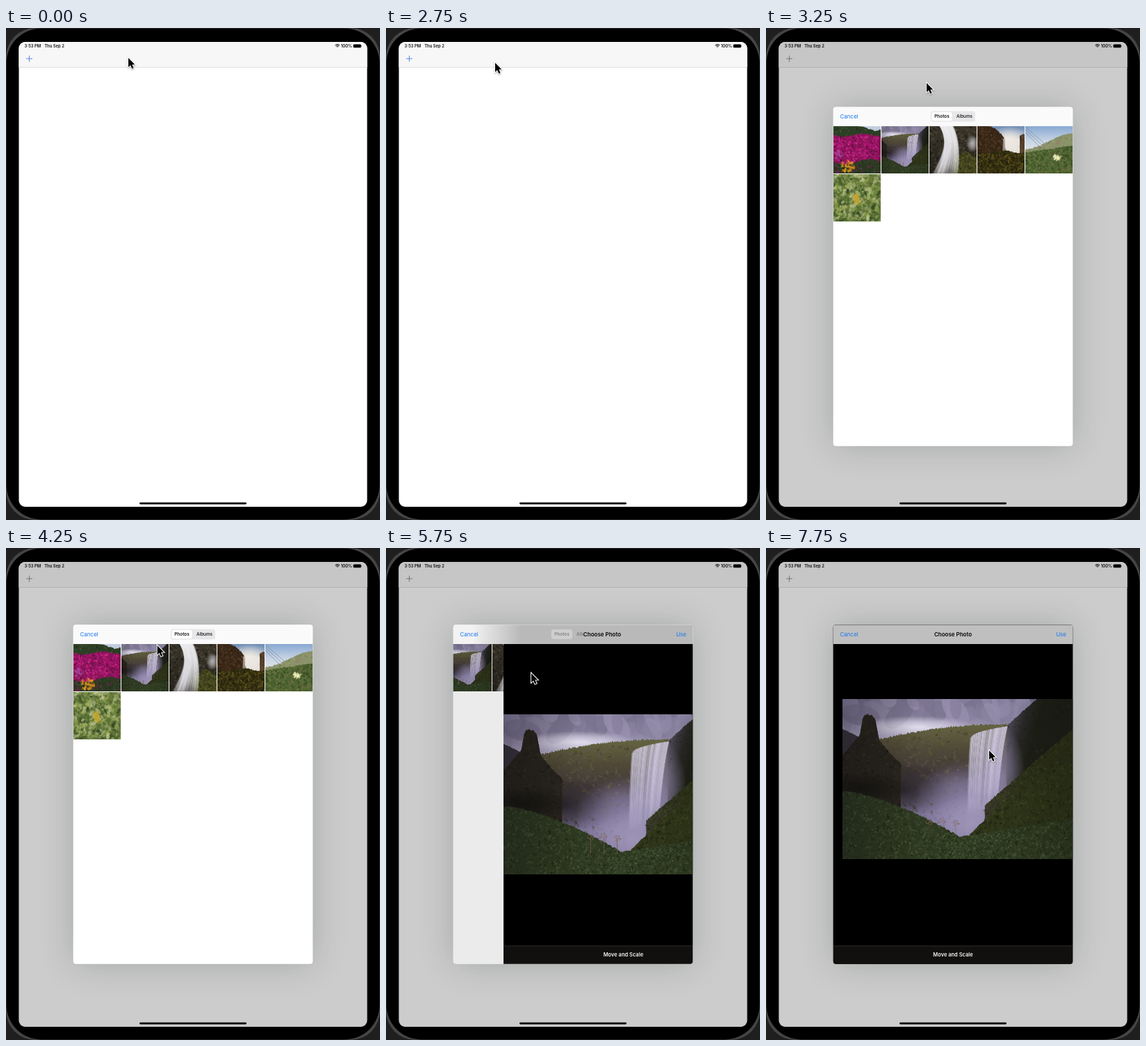
Write an HTML page with a canvas that moves like this. It is 538 px wide and 707 px high and loops after 8 s.

```html
<!DOCTYPE html>
<html lang="en">
<head>
<meta charset="utf-8">
<title>Photo picker</title>
<style>
html, body { margin: 0; width: 100%; height: 100%; overflow: hidden; background: #000; }
canvas { display: block; width: 538px; height: 707px; }
</style>
</head>
<body>
<canvas id="stage"></canvas>
<script>
const W = 538, H = 707, LOOP = 8000, STEP = 250;
const SHEET = { x: 96.7, y: 110.3, w: 344.6, h: 487.4 };
const EDGE = 97, BAR_END = 138, CELL = 68, PITCH = 69;
const PHOTO = { w: 344, h: 230, y: 239 };
const BLUE = '#1a78f0', INK = '#111';
const canvas = document.getElementById('stage');
const ratio = window.devicePixelRatio || 1;
canvas.width = W * ratio;
canvas.height = H * ratio;
const ctx = canvas.getContext('2d');

const clamp = v => Math.max(0, Math.min(1, v));
const mix = (a, b, u) => a + (b - a) * u;
const smooth = u => u * u * (3 - 2 * u);
const bell = (x, mid, width, power = 2) => Math.exp(-(Math.abs((x - mid) / width) ** power));

let seed = 11;
function rnd() {
  seed = (seed * 1664525 + 1013904223) >>> 0;
  return seed / 4294967296;
}

function box(g, x, y, w, h, r, fill) {
  g.beginPath();
  g.roundRect(x, y, w, h, r);
  g.fillStyle = fill;
  g.fill();
}

function text(str, x, y, size, weight, color, align = 'left') {
  ctx.font = `${weight} ${size}px Inter, "Liberation Sans", sans-serif`;
  ctx.textAlign = align;
  ctx.fillStyle = color;
  ctx.fillText(str, x, y);
}

// ---- pictures ----

function picture(w, h, paint) {
  const c = document.createElement('canvas');
  c.width = w * 2;
  c.height = h * 2;
  const g = c.getContext('2d');
  g.scale(2, 2);
  paint(g, w, h);
  return c;
}

function shade(g, x0, y0, x1, y1, colors) {
  const s = g.createLinearGradient(x0, y0, x1, y1);
  colors.forEach((c, i) => s.addColorStop(i / (colors.length - 1), c));
  return s;
}

function sky(g, w, h, ...colors) {
  g.fillStyle = shade(g, 0, 0, 0, h, colors);
  g.fillRect(0, 0, w, h);
}

function glow(g, x, y, rx, ry, rgb, alpha) {
  g.save();
  g.translate(x, y);
  g.scale(rx, ry);
  const s = g.createRadialGradient(0, 0, 0, 0, 0, 1);
  s.addColorStop(0, `rgba(${rgb},${alpha})`);
  s.addColorStop(0.5, `rgba(${rgb},${alpha * 0.6})`);
  s.addColorStop(1, `rgba(${rgb},0)`);
  g.fillStyle = s;
  g.fillRect(-1, -1, 2, 2);
  g.restore();
}

function flecks(g, count, size, tints, place) {
  for (let i = 0; i < count; i++) {
    g.fillStyle = tints[i % tints.length];
    g.globalAlpha = 0.2 + rnd() * 0.5;
    g.beginPath();
    g.ellipse(...place(), size * (0.4 + rnd()), size * (0.2 + rnd() * 0.4), rnd() * 3, 0, 7);
    g.fill();
  }
  g.globalAlpha = 1;
}

const cluster = (x, y, rx, ry) => () => {
  const a = rnd() * 7, r = Math.sqrt(rnd());
  return [x + Math.cos(a) * r * rx, y + Math.sin(a) * r * ry];
};

// Everything under the skyline top(x), with a ragged edge and flecks.
function land(g, x0, x1, top, fill, tints, count, size = 2) {
  const floor = g.canvas.height / 2;
  g.beginPath();
  g.moveTo(x0, floor);
  for (let x = x0; x <= x1; x++) g.lineTo(x, top(x) + (rnd() - 0.5) * size);
  g.lineTo(x1, floor);
  g.fillStyle = fill;
  g.fill();
  flecks(g, count, size, tints, () => {
    const x = mix(x0, x1, rnd());
    return [x, mix(top(x) + size / 2, floor, rnd())];
  });
}

// Soft strands of water; at(u) gives the start, bend and end of each.
function strands(g, count, width, rgb, at) {
  for (let i = 0; i < count; i++) {
    const [x0, y0, cx, cy, x1, y1] = at(i / (count - 1));
    const a = 0.35 + rnd() * 0.35;
    g.strokeStyle = shade(g, 0, y0, 0, y1, [a, a * 0.8, a * 0.5, 0].map(v => `rgba(${rgb},${v})`));
    g.lineWidth = width * (0.5 + rnd());
    g.beginPath();
    g.moveTo(x0, y0);
    g.quadraticCurveTo(cx, cy, x1, y1);
    g.stroke();
  }
}

const valley = picture(PHOTO.w, PHOTO.h, (g, w, h) => {
  sky(g, w, 60, '#6c6782', '#9088a6', '#b9b2cd');
  flecks(g, 60, 26, ['#7a738f', '#9b93b2', '#8a83a0'], () => [rnd() * w, rnd() * 24]);
  glow(g, 105, 40, 85, 16, '236,233,247', 0.9);
  land(g, 0, 40, x => 42 + x * 0.5, '#3b3740', ['#2e2b30'], 20);
  land(g, 54, 250, x => 36 + 20 * ((x - 230) / 170) ** 2,
    shade(g, 0, 40, 0, 165, ['#62623f', '#514a38', '#443c3b', '#57506a', '#7d749a']),
    ['#3d3b2a', '#5d6138', '#4f463e', '#665d55'], 900, 3);
  glow(g, 90, 130, 75, 40, '36,31,32', 0.75);
  glow(g, 185, 150, 85, 62, '146,136,174', 0.9);
  glow(g, 185, 178, 60, 40, '160,151,186', 0.9);
  land(g, 236, w, x => 38 - (x - 237) * 0.9,
    shade(g, 232, 0, 285, 15, ['#8d84a4', '#4c4654', '#2a2927', '#1e2017']), ['#1b1c17', '#2f3320'], 300);
  glow(g, 225, 105, 38, 70, '150,140,176', 0.8);
  strands(g, 44, 2.2, '214,208,234', u => [
    186 + 51 * u, 55 - 16 * Math.sqrt(u), 183 + 45 * u, 75, 181 + 40 * u, 168
  ]);
  land(g, 205, w, x => 150 - (x - 208) * 0.87,
    shade(g, 205, 0, 260, 0, ['#3e3b32', '#2d321a']), ['#1d220f', '#444c22', '#353d1a', '#262b14'], 1300, 2.4);
  land(g, 183, w, x => 195 - 103 * Math.sin((x - 183) / 161 * Math.PI / 2),
    '#2f3519', ['#1c210f', '#444c25', '#363e20', '#262c15'], 1300, 2.4);
  land(g, 0, 84, x => 100 - 52 * bell(x, 36, 36) - 26 * bell(x, 39, 12, 6),
    '#2a261f', ['#1c1a15', '#3c3726', '#35302a', '#27251c'], 900, 2.2);
  glow(g, 30, 128, 70, 24, '18,18,13', 0.7);
  land(g, 0, w, x => x < 170 ? 132 + 66 * (x / 170) ** 1.5 : 198 - (x - 170) * 0.17,
    '#2f3a22', ['#1d2714', '#435332', '#4f6040', '#273219', '#394a2b'], 2600, 2.3);
  for (let x = 125; x < 170; x += 19) {
    flecks(g, 22, 1.4, ['#8d735e', '#765f50'], cluster(x, 174 + rnd() * 8, 5, 5));
    g.fillStyle = '#6d5b4c';
    g.fillRect(x, 178, 0.6, 22);
  }
  g.fillStyle = shade(g, 0, 0, w, 0, ['rgba(8,6,14,.3)', 'rgba(0,0,0,0)', 'rgba(0,0,0,0)', 'rgba(8,8,6,.25)']);
  g.fillRect(0, 0, w, h);
});

const blossoms = picture(CELL, CELL, (g, w, h) => {
  sky(g, w, h, '#c3cfdf', '#a5b5c4');
  land(g, 0, w, x => 8 * bell(x, 60, 18) - 2, '#2c3f25', ['#16251a', '#48633a', '#5f7c4c'], 240);
  land(g, 0, w, x => 13 + 2 * Math.sin(x / 9), '#8a1459', ['#d81f91', '#c21880', '#4a1035', '#e63aa3', '#b0126e'], 700);
  land(g, 0, w, x => 51 + 4 * Math.sin(x / 11), '#2b3a22', ['#1a2818', '#8e1a5c', '#48603a'], 120);
  flecks(g, 30, 2, ['#8b5caa', '#a25aa0'], cluster(8, 42, 8, 8));
  flecks(g, 60, 2.6, ['#f5a21b', '#f7bd31', '#dd7d12'], cluster(20, 58, 10, 8));
});

const cascade = picture(CELL, CELL, (g, w, h) => {
  sky(g, w, h, '#3a352a', '#25221c');
  flecks(g, 340, 2.6, ['#181713', '#4a4333', '#5a523f'], () => [rnd() * w, rnd() * h]);
  land(g, 36, w, x => 44 - 8 * bell(x, 52, 8), '#42431f', ['#6d672b', '#25270f', '#545a2a'], 220);
  strands(g, 40, 2, '238,238,241', u => [14 + 18 * u, -2, 34 + 14 * u, 26, 4 + 34 * u, 84]);
  strands(g, 20, 2, '222,220,226', u => [22 + 10 * u, 24, 20 + 6 * u, 46, 22 * u - 4, 84]);
  glow(g, 62, 25, 9, 13, '196,194,196', 0.9);
});

const falls = picture(CELL, CELL, (g, w) => {
  sky(g, w, 40, '#6f8cb4', '#b9c4d2', '#e9e0d4');
  glow(g, 46, 20, 28, 20, '255,245,230', 0.9);
  land(g, 0, 40, x => 18 * (x / 38) ** 3 - 2, '#392717', ['#21170f', '#553b21', '#63472a'], 260);
  strands(g, 30, 1.8, '236,231,226', u => [38 + 24 * u, 18, 38 + 25 * u, 28, 36 + 28 * u, 48]);
  land(g, 61, w, x => 14 - (x - 61) * 0.5, '#5c4530', ['#3c2c1d'], 30);
  land(g, 0, w, x => 37 + 2 * Math.sin(x / 8), '#2f2b10', ['#5e521c', '#18180a', '#766321', '#3d3918'], 520);
});

const meadow = picture(CELL, CELL, (g, w) => {
  sky(g, w, 42, '#88a8d2', '#c8d5e4', '#e9ebe8');
  land(g, 0, w, x => 33 - 23 * smooth(x / w), '#8b936a', ['#657247', '#a3a179', '#997a68'], 200);
  land(g, 0, w, x => 38 - x * 0.15, '#4f6531', ['#2a3f1c', '#748647', '#84704f', '#38502a'], 500);
  g.strokeStyle = '#667488';
  g.lineWidth = 0.5;
  for (let i = 0; i < 3; i++) {
    g.beginPath();
    g.moveTo(0, 9 - i * 4);
    g.lineTo(20 + i * 4, 29 - i * 2);
    g.stroke();
  }
  flecks(g, 34, 2.6, ['#fbfae0', '#f3edaa'], cluster(45, 45, 5, 4));
});

const leaves = picture(CELL, CELL, (g, w, h) => {
  sky(g, w, h, '#6b7d3e', '#5d7135');
  flecks(g, 520, 4.5, ['#2e4420', '#8da052', '#c3ca9a', '#4c662d', '#a9b55e'], () => [rnd() * w, rnd() * h]);
  flecks(g, 40, 3, ['#d3ae31', '#c9a42c'], cluster(33, 36, 3.5, 8));
});

const thumbs = [blossoms, valley, cascade, falls, meadow, leaves];

// ---- motion ----

const START = [176, 43], GRAB = [275, 370], PULL = 0.275;
// begin, end, x, y
const moves = [
  [0, 1000, 33, 42], [1750, 2750, 157, 50], [2750, 3250, 231, 79],
  [3250, 5000, 209, 180], [6000, 6750, ...GRAB], [7000, 7750, 321, 291]
];

function pointerAt(t) {
  let [x, y] = START;
  for (const [begin, end, tx, ty] of moves) {
    const u = smooth(clamp((t - begin) / (end - begin)));
    x = mix(x, tx, u);
    y = mix(y, ty, u);
  }
  return [x, y];
}

// Share of the rise still to go, as a critically damped spring.
function riseLeft(t) {
  const k = Math.max(0, t - 2835) * 0.0178;
  return t > 3250 ? 0 : Math.exp(-k) * (1 + k);
}

const pushAt = t => t < 5750 ? 0 : t < 6000 ? 0.79 : 1;

// ---- drawing ----

function drawDevice() {
  ctx.fillStyle = '#1f1f1f';
  ctx.fillRect(0, 0, W, H);
  box(ctx, 0, 0, W, H, 42, '#454545');
  box(ctx, 0.6, 0.6, W - 1.2, H - 1.2, 50, '#000');
}

function drawStatus() {
  text('3:53 PM', 26.5, 28, 5.9, 600, INK);
  text('Thu Sep 2', 55.2, 28, 5.9, 600, INK);
  text('100%', 498, 28, 5.9, 600, INK, 'right');
  ctx.strokeStyle = INK;
  ctx.lineWidth = 1;
  for (let r = 1.5; r < 5; r += 1.65) {
    ctx.beginPath();
    ctx.arc(476.8, 28.3, r, -Math.PI * 0.75, -Math.PI * 0.25);
    ctx.stroke();
  }
  box(ctx, 499.3, 23.2, 11.7, 5.4, 1.5, '#777');
  box(ctx, 499.8, 23.7, 10.7, 4.4, 1.1, '#000');
  box(ctx, 511.3, 25, 0.7, 1.8, 0.3, '#777');
}

function drawScreen(dim) {
  ctx.fillStyle = '#fff';
  ctx.fillRect(18, 20, 502, 668);
  ctx.fillStyle = '#f7f7f7';
  ctx.fillRect(18, 20, 502, 36);
  ctx.fillStyle = '#d8d8d8';
  ctx.fillRect(18, 56, 502, 0.8);
  drawStatus();
  ctx.fillStyle = dim > 0.5 ? '#888' : '#4a78e8';
  ctx.fillRect(29, 43.6, 9, 0.9);
  ctx.fillRect(33.05, 39.6, 0.9, 9);
  box(ctx, 192, 681.7, 154, 2.8, 1.4, '#000');
  ctx.fillStyle = `rgba(0,0,0,${0.2 * dim})`;
  ctx.fillRect(18, 20, 502, 668);
}

function drawGrid() {
  thumbs.forEach((img, i) => {
    const x = EDGE + (i % 5) * PITCH, y = BAR_END + Math.floor(i / 5) * PITCH;
    const side = img.height;
    ctx.drawImage(img, (img.width - side) / 2, 0, side, side, x, y, CELL, CELL);
  });
}

function drawCrop(dx, dy) {
  ctx.fillStyle = '#000';
  ctx.fillRect(SHEET.x, BAR_END, SHEET.w, 434);
  ctx.drawImage(valley, EDGE + dx, PHOTO.y + dy, PHOTO.w, PHOTO.h);
  ctx.fillStyle = '#11100f';
  ctx.fillRect(SHEET.x, 572, SHEET.w, 26);
  ctx.fillStyle = '#383838';
  ctx.fillRect(SHEET.x, 571.5, SHEET.w, 0.7);
  text('Move and Scale', 269, 586.7, 7.5, 600, '#f4f4f4', 'center');
}

function drawSegments(push) {
  ctx.globalAlpha = push ? 0.4 : 1;
  if (!push) box(ctx, 237, 116.5, 64, 15, 3.5, '#e7e7e9');
  box(ctx, 238, 117.3, 30, 13.4, 3, push ? '#eee' : '#fff');
  ctx.strokeStyle = '#d9d9db';
  ctx.lineWidth = 0.5;
  ctx.stroke();
  text('Photos', 253, 126.3, 6.4, 600, INK, 'center');
  text(push ? 'Alb' : 'Albums', 274, 126.3, 6.4, 500, INK);
  ctx.globalAlpha = 1;
}

function drawBar(push, gap) {
  const front = SHEET.x + gap;
  ctx.fillStyle = !push ? '#fafafa' : push === 1 ? '#bfbfbf'
    : shade(ctx, front - 45, 0, front + 25, 0, ['#f3f3f3', '#b9b9b9']);
  ctx.fillRect(SHEET.x, SHEET.y, SHEET.w, BAR_END - SHEET.y);
  text('Cancel', 106.5, 127.2, 8, 400, BLUE);
  if (push < 1) drawSegments(push);
  if (push) {
    text('Choose Photo', 269 + gap * 0.58, 127.2, 8, 600, '#0a0a0a', 'center');
    text('Use', 432, 127.2, 8, 400, BLUE, 'right');
  }
}

function drawSheet(t, left, dim) {
  const push = pushAt(t), gap = (1 - push) * SHEET.w;
  const [px, py] = pointerAt(t), pull = t > 7000 ? PULL : 0;
  ctx.save();
  ctx.translate(0, left * (H - SHEET.y));
  ctx.save();
  ctx.shadowColor = `rgba(12,28,18,${0.2 * dim})`;
  ctx.shadowBlur = 50 * ratio;
  box(ctx, SHEET.x, SHEET.y, SHEET.w, SHEET.h, 4, push === 1 ? '#000' : '#fff');
  ctx.restore();
  ctx.beginPath();
  ctx.roundRect(SHEET.x, SHEET.y, SHEET.w, SHEET.h, 4);
  ctx.clip();
  if (push < 1) {
    ctx.save();
    ctx.translate(-push * SHEET.w * 0.3, 0);
    drawGrid();
    ctx.restore();
    ctx.fillStyle = `rgba(0,0,0,${0.1 * push})`;
    ctx.fillRect(SHEET.x, SHEET.y, SHEET.w, SHEET.h);
  }
  if (push) {
    ctx.save();
    ctx.translate(gap, 0);
    drawCrop((px - GRAB[0]) * pull, (py - GRAB[1]) * pull);
    ctx.restore();
  }
  drawBar(push, gap);
  ctx.restore();
}

const arrow = new Path2D('M0 0V13.2L3 10.4 5.3 15.4 7.6 14.4 5.4 9.6 9.4 9.4Z');

function drawPointer([x, y]) {
  ctx.save();
  ctx.translate(x, y);
  ctx.shadowColor = 'rgba(0,0,0,.35)';
  ctx.shadowBlur = 2 * ratio;
  ctx.shadowOffsetY = ratio;
  ctx.strokeStyle = '#fff';
  ctx.lineWidth = 2;
  ctx.stroke(arrow);
  ctx.shadowColor = 'transparent';
  ctx.fillStyle = '#000';
  ctx.fill(arrow);
  ctx.restore();
}

function draw(t) {
  const open = t >= 3000, left = riseLeft(t), dim = open ? 1 - left : 0;
  ctx.setTransform(ratio, 0, 0, ratio, 0, 0);
  drawDevice();
  ctx.save();
  ctx.beginPath();
  ctx.roundRect(18.5, 20, 501, 668, 9);
  ctx.clip();
  drawScreen(dim);
  if (open) drawSheet(t, left, dim);
  ctx.restore();
  drawPointer(pointerAt(t));
}

function tick() {
  const t = performance.now() % LOOP;
  draw(Math.floor(t / STEP) * STEP);
  requestAnimationFrame(tick);
}
tick();
</script>
</body>
</html>
```
